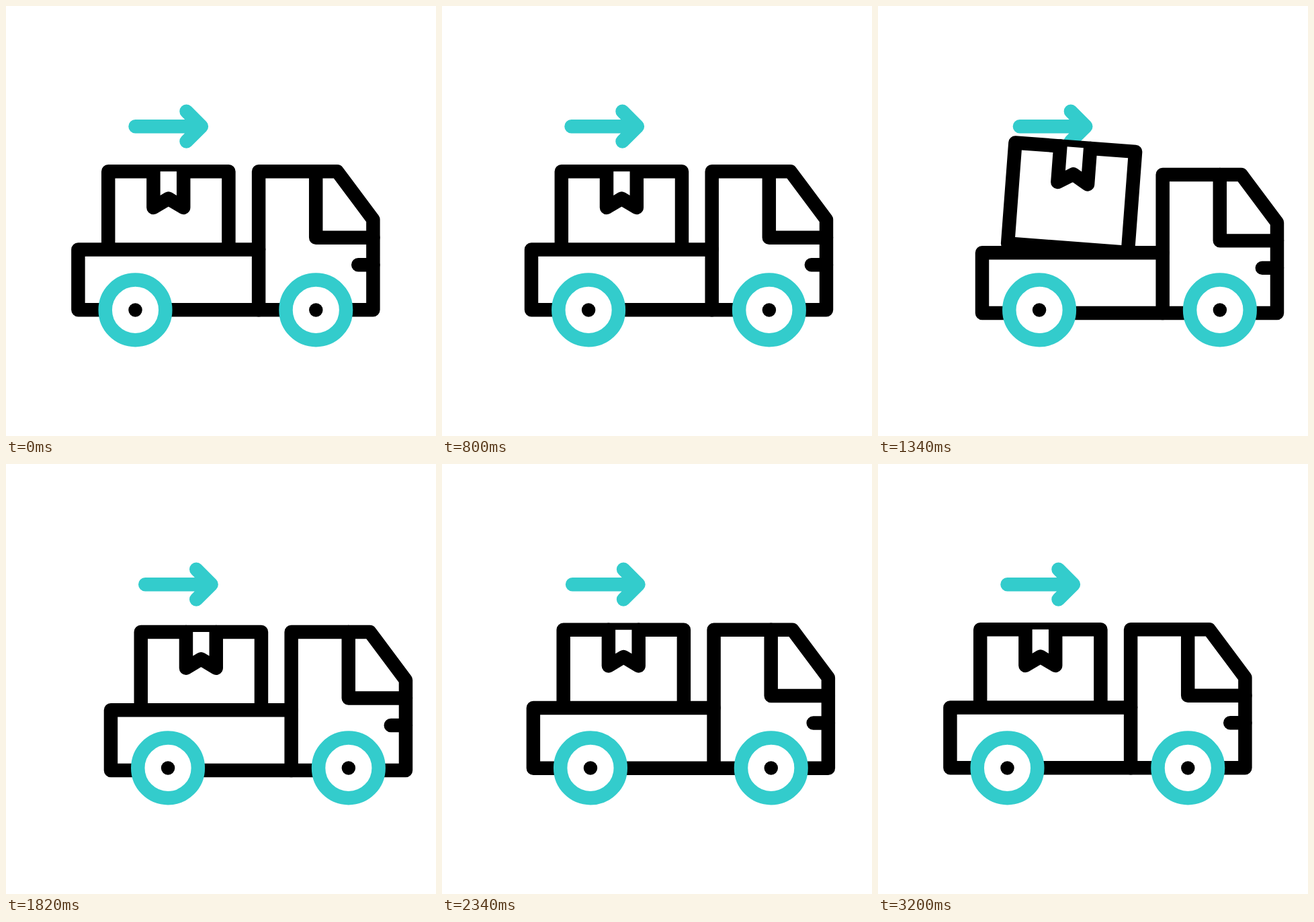
These frames come from a looping animation (640x640 px, 3.22 s). An HTML page:

```html
<!DOCTYPE html>
<html lang="en">
<head>
<meta charset="utf-8">
<title>Delivery truck</title>
<style>
  html, body { margin: 0; width: 100%; height: 100%; overflow: hidden; background: #fff; }
  svg { display: block; width: 100vw; height: 100vh; }
  g { fill: #fff; stroke: #000; stroke-width: 20.48; stroke-linecap: round; stroke-linejoin: round; }
  .teal { stroke: #3cc; }
  .hub { fill: #000; stroke: none; }
</style>
</head>
<body>
<svg viewBox="0 0 640 640">
  <g id="arrow" class="teal" style="fill:none">
    <path d="M192.5 179.2H290.9M268.5 156.8l22.4 22.4l-22.4 22.4"/>
  </g>
  <g id="box">
    <path d="M152.2 246.3H331.4V396.7H152.2Z"/>
    <path d="M219.4 246.3V300L241.8 286.6L264.2 300V246.3"/>
  </g>
  <g id="body">
    <path d="M107.4 362.6H376.1V246.3H493L546.4 317.8V452.3H107.4Z"/>
    <path d="M376.1 362.6V452.3M461.2 246.3V344.7H546.4M524.2 385.2H546.4" fill="none"/>
  </g>
  <g id="wheels" class="teal">
    <circle cx="192.5" cy="452.4" r="44.8"/>
    <circle cx="461.3" cy="452.4" r="44.8"/>
    <circle class="hub" cx="192.5" cy="452.4" r="10.24"/>
    <circle class="hub" cx="461.3" cy="452.4" r="10.24"/>
  </g>
</svg>
<script>
  const LOOP = 3220, STEP = 20;
  const [arrow, box, body, wheels] =
    ['arrow', 'box', 'body', 'wheels'].map(id => document.getElementById(id));

  // Eased swing 0 -> 1 -> 0 over one period
  function swing(t, period) {
    const p = 1 - Math.abs(1 - 2 * (t % period) / period);
    return p * p * (3 - 2 * p);
  }

  function move(el, x, y, extra = '') {
    el.setAttribute('transform', `translate(${x} ${y}) ${extra}`);
  }

  function draw(t) {
    const drive = 51.2 * swing(t, 3200);
    const beat = swing(t, 800);
    const bob = 6.5 * beat;
    const hop = t >= 800 && t < 1600 ? beat : 0;
    move(arrow, 25.6 * beat, 0);
    move(wheels, drive, 0);
    move(body, drive, bob);
    move(box, drive, bob - 57 * hop, `rotate(${6 * hop} 241.8 304.4)`);
  }

  const start = performance.now();
  function tick() {
    const t = (performance.now() - start) % LOOP;
    draw(Math.floor(t / STEP) * STEP);
    requestAnimationFrame(tick);
  }
  tick();
</script>
</body>
</html>
```
